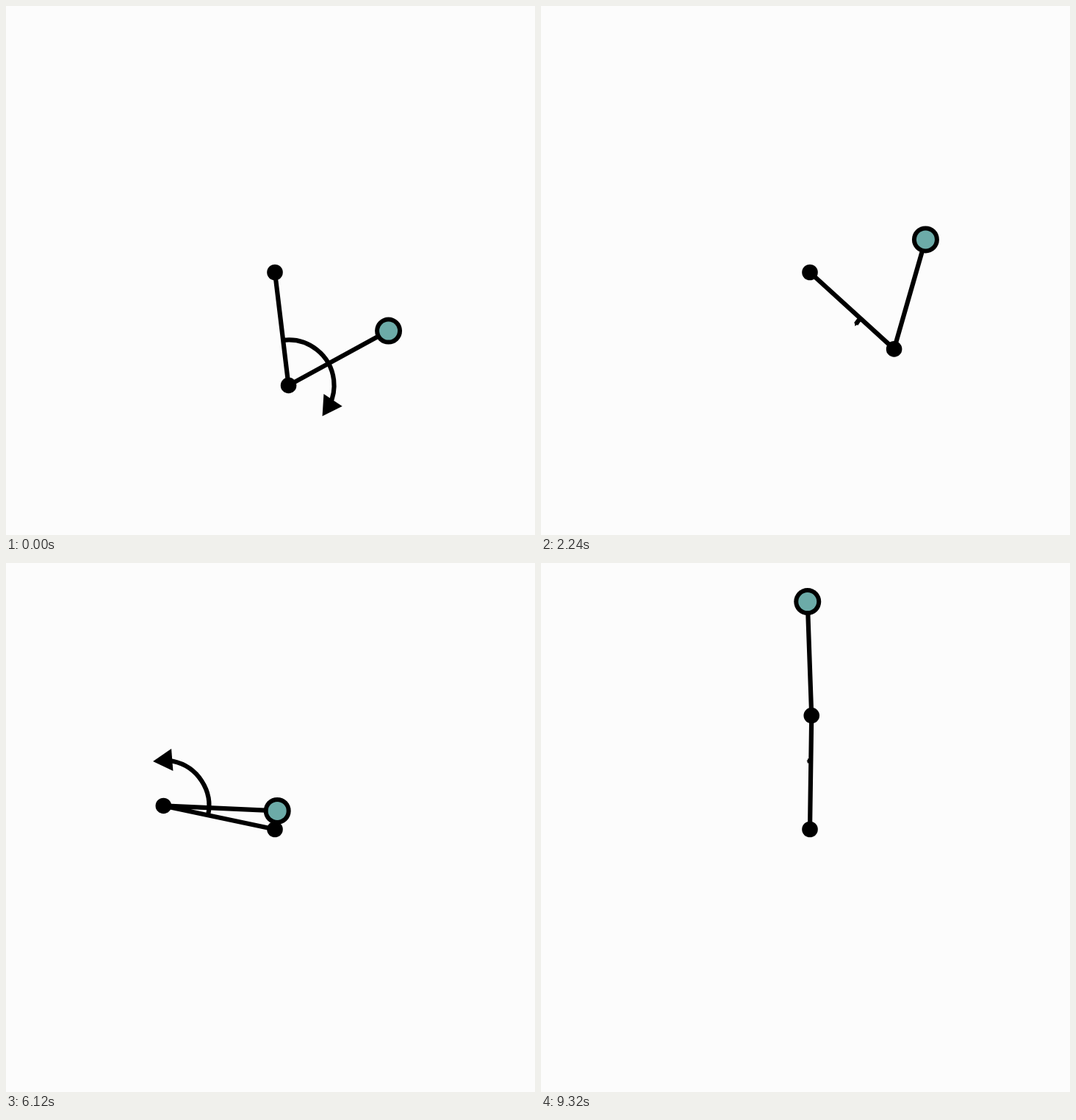
An HTML page with a canvas that plays this animation: 720 px wide and 720 px high, repeating every 9340 ms.

```html
<!DOCTYPE html>
<html lang="en">
<head>
<meta charset="utf-8">
<title>Two-link swing-up</title>
<style>
  html, body { margin: 0; width: 100%; height: 100%; overflow: hidden; background: #fcfcfc; }
  canvas { display: block; width: 720px; height: 720px; }
</style>
</head>
<body>
<canvas id="stage" width="720" height="720"></canvas>
<script>
const ctx = document.getElementById('stage').getContext('2d');
const LOOP = 9340, STEP = 20;
const PIVOT = { x: 366, y: 362.5 };
const LINK = 155, ARC = 62, TILT = 0.13;
const FAST = 500, SLOW = 8000;

// Pose: time (ms), upper and lower link angle from straight down (rad),
// torque sweep (deg, clockwise positive). The last pose hands over to balancing,
// which drifts along `rest`: upper angle, lower angle and sweep near the top.
const runs = [
  {
    poses: [
      [0, 0.12, 2.071, 123],
      [160, 0.22, 1.57, 118],
      [500, -0.4, 0.47, -70],
      [940, -1.75, -0.26, 90],
      [1220, -1.79, -1.55, 102],
      [1420, -1.564, -0.958, 83],
      [1700, -0.2, 0.15, 0],
      [1900, 0.3, 1.2, -45],
      [2230, 0.8, 2.85, -10],
      [2840, 3.247, 2.367, 30],
      [3300, 3.106, 3.042, -17]
    ],
    upright: [Math.PI, Math.PI, 0],
    rest: [-0.036, 0.1125, 11]
  },
  {
    poses: [
      [5140, 0.25, 2.1, 118],
      [5640, -0.55, 1.303, 60],
      [5860, -0.95, 0.42, -110],
      [6120, -1.779, 1.526, -99],
      [6370, -1.9, 3.2, -60],
      [6610, -1.6, 4.66, -10],
      [7200, 1.22, 7.9, 5],
      [7540, 2.54, 8.743, 20],
      [7740, 2.898, 9.009, 35]
    ],
    upright: [Math.PI, 3 * Math.PI, 0],
    rest: [-0.0053, 0.0682, 3.5]
  }
];

// Smooth curve through one column of the poses
function swing(poses, t, col) {
  const last = poses.length - 1;
  let i = 0;
  while (poses[i + 1][0] <= t) i++;
  const slope = k => {
    const p = poses[Math.max(k - 1, 0)], n = poses[Math.min(k + 1, last)];
    return (n[col] - p[col]) / (n[0] - p[0]);
  };
  const [p, n] = [poses[i], poses[i + 1]];
  const h = n[0] - p[0], s = (t - p[0]) / h, r = 1 - s;
  return r * r * ((1 + 2 * s) * p[col] + s * h * slope(i))
    + s * s * ((1 + 2 * r) * n[col] - r * h * slope(i + 1));
}

// A quick decay towards a slowly fading lean
function balance(offset, rest, age) {
  return rest * Math.exp(-age / SLOW) + (offset - rest) * Math.exp(-age / FAST);
}

function stateAt(t) {
  const { poses, upright, rest } = t < runs[1].poses[0][0] ? runs[0] : runs[1];
  const end = poses[poses.length - 1], age = t - end[0];
  return upright.map((top, i) => age < 0
    ? swing(poses, t, i + 1)
    : top + balance(end[i + 1] - top, rest[i], age));
}

const hang = (p, angle) => ({ x: p.x + LINK * Math.sin(angle), y: p.y + LINK * Math.cos(angle) });

function disc(p, r) {
  ctx.beginPath();
  ctx.arc(p.x, p.y, r, 0, 2 * Math.PI);
  ctx.fill();
}

function torqueArrow(elbow, angle, degrees) {
  const start = Math.atan2(-Math.cos(angle), -Math.sin(angle));
  const end = start + degrees * Math.PI / 180;
  ctx.beginPath();
  ctx.arc(elbow.x, elbow.y, ARC, start, end, degrees < 0);
  ctx.stroke();

  const size = Math.min(17.5, Math.abs(degrees) * 0.337);
  const heading = end + Math.sign(degrees) * (Math.PI / 2 + TILT);
  const cx = elbow.x + ARC * Math.cos(end), cy = elbow.y + ARC * Math.sin(end);
  ctx.beginPath();
  for (let k = 0; k < 3; k++) {
    const v = heading + k * 2 * Math.PI / 3;
    ctx.lineTo(cx + size * Math.cos(v), cy + size * Math.sin(v));
  }
  ctx.fill();
}

function draw(t) {
  const [upper, lower, torque] = stateAt(t);
  const elbow = hang(PIVOT, upper), tip = hang(elbow, lower);

  ctx.fillStyle = '#fcfcfc';
  ctx.fillRect(0, 0, 720, 720);
  ctx.fillStyle = ctx.strokeStyle = '#000';
  ctx.lineWidth = 6.2;
  ctx.lineJoin = 'round';
  ctx.beginPath();
  ctx.moveTo(PIVOT.x, PIVOT.y);
  ctx.lineTo(elbow.x, elbow.y);
  ctx.lineTo(tip.x, tip.y);
  ctx.stroke();
  torqueArrow(elbow, upper, torque);
  disc(PIVOT, 10.8);
  disc(elbow, 10.8);
  disc(tip, 18.5);
  ctx.fillStyle = '#6caba8';
  disc(tip, 12.5);
}

const origin = performance.now();
function tick() {
  const t = (performance.now() - origin) % LOOP;
  draw(Math.floor(t / STEP) * STEP);
  requestAnimationFrame(tick);
}
tick();
</script>
</body>
</html>
```
